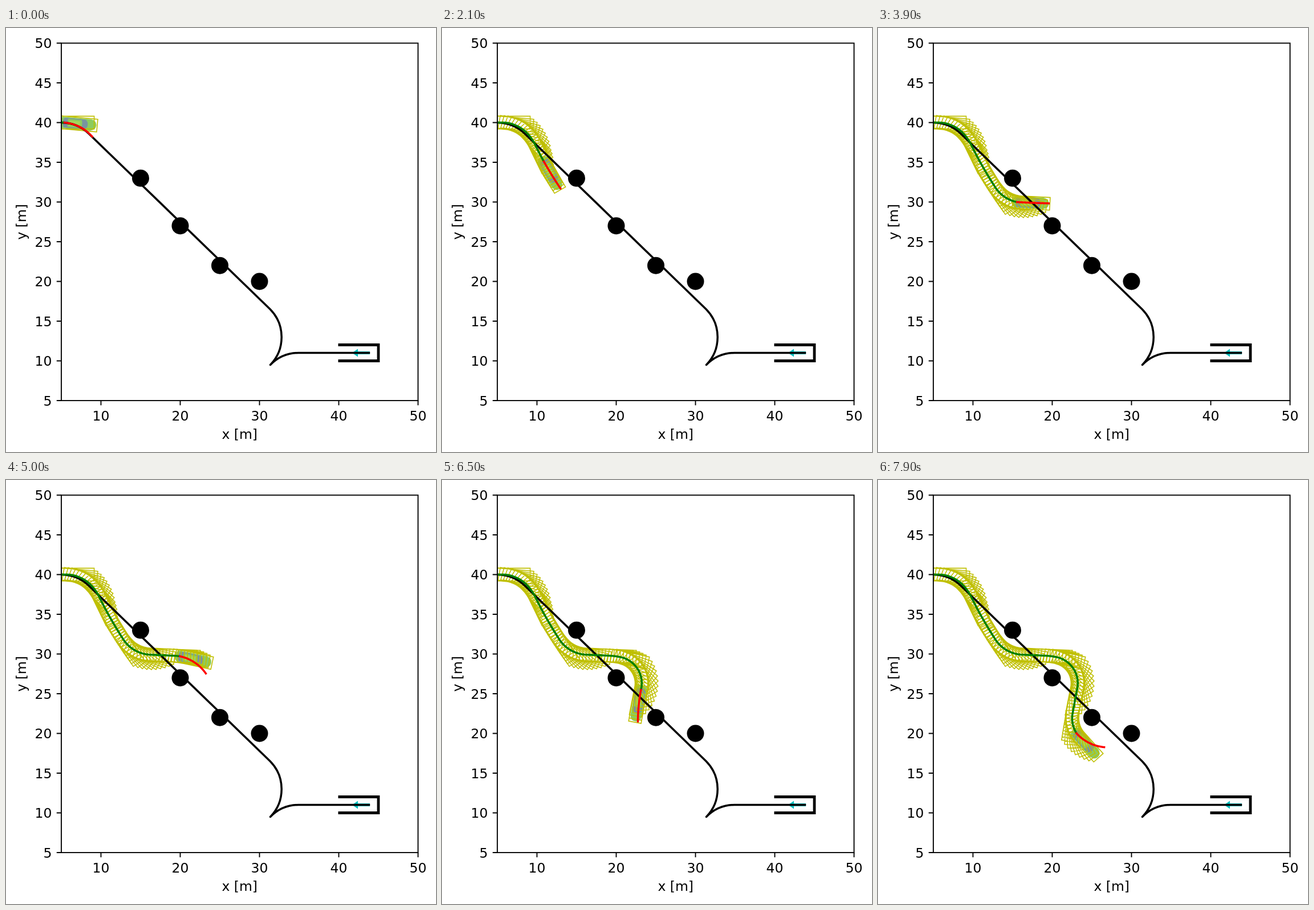
Write an HTML page that moves like this. It is 754 px wide and 742 px high and loops after 8 s.

```html
<!DOCTYPE html>
<html lang="en">
<head>
<meta charset="utf-8">
<title>Parking planner</title>
<style>
  html, body { margin: 0; width: 100%; height: 100%; overflow: hidden; background: #fff; }
  svg { display: block; width: 754px; height: 742px; }
  text { font: 23.5px "DejaVu Sans", sans-serif; }
  .line { fill: none; stroke-width: 3.5; stroke-linejoin: round; }
  .axis { fill: none; stroke: #000; stroke-width: 1.88; }
</style>
</head>
<body>
<svg viewBox="0 0 754 742">
  <clipPath id="area"><rect x="97" y="26.5" width="625.5" height="625.5"/></clipPath>
  <g clip-path="url(#area)">
    <g id="car">
      <path fill="#8ccb5e" d="M-3-10H46Q56-8 56 0T46 10H-3Q-8 9-8 0T-3-10Z"/>
      <path fill="#7894a0" d="M0-8.5H36Q41-6 41 0T36 8.5H0Q-3 6-3 0T0-8.5Z"/>
      <path fill="#8ccb5e" d="M6-7H30Q32 0 30 7H6Q4 0 6-7Z"/>
      <path fill="#a5d65a" d="M9-4.5H27V4.5H9Z"/>
    </g>
    <path fill="#00bfbf" d="M638 566H617V561.5L607 568.5L617 575.5V571H638Z"/>
    <path id="boxes" fill="none" stroke="#bfbf00" stroke-width="1.6"/>
    <path class="line" stroke="#000" stroke-linecap="square" d="M97 165.5A69.5 69.5 0 0 1 145.5 185.2L463 492A69.5 69.5 0 0 1 463.5 589.5A69.5 69.5 0 0 1 512.5 568.5H636.5"/>
    <path fill="none" stroke="#000" stroke-width="4.8" d="M582.5 554.5H653V582.5H582.5"/>
    <g id="obstacles"></g>
    <path id="trail" class="line" stroke="#008000"/>
    <path id="plan" class="line" stroke="#f00" stroke-linecap="square"/>
  </g>
  <rect class="axis" x="97" y="26.5" width="625.5" height="625.5"/>
  <path id="ticks" class="axis"/>
  <g id="labels">
    <text x="409.7" y="719" text-anchor="middle">x [m]</text>
    <text transform="translate(35 339.3) rotate(-90)" text-anchor="middle">y [m]</text>
  </g>
</svg>
<script>
const SCALE = 13.9, STEP = 100, STEPS = 80;
const REAR = -8, FRONT = 57.6, HALF = 11.1, REACH = 55.6;
const LAG = 1.5;       // steps by which the course trails the heading
const LOOKAHEAD = 7;   // steps used to estimate the planned turn
const MAX_TURN = 43;   // degrees over one planned arc

const $ = id => document.getElementById(id);
const px = x => 97 + (x - 5) * SCALE;
const py = y => 652 - (y - 5) * SCALE;
const cos = deg => Math.cos(deg * Math.PI / 180);
const sin = deg => Math.sin(deg * Math.PI / 180);
const point = (x, y) => x.toFixed(2) + " " + y.toFixed(2);

function add(parent, tag, attrs, text = "") {
  const el = document.createElementNS("http://www.w3.org/2000/svg", tag);
  for (const key in attrs) el.setAttribute(key, attrs[key]);
  el.textContent = text;
  $(parent).append(el);
}

let ticks = "";
for (let v = 10; v <= 50; v += 10) {
  ticks += `M${px(v)} 652v8.2`;
  add("labels", "text", { x: px(v), y: 686.5, "text-anchor": "middle" }, v);
}
for (let v = 5; v <= 50; v += 5) {
  ticks += `M97 ${py(v)}h-8.2`;
  add("labels", "text", { x: 80.5, y: py(v) + 8.6, "text-anchor": "end" }, v);
}
$("ticks").setAttribute("d", ticks);
for (const [x, y] of [[15, 33], [20, 27], [25, 22], [30, 20]])
  add("obstacles", "circle", { cx: px(x), cy: py(y), r: 15 });

// Steering: heading in degrees at a few steps, linear in between
const steering = [
  [0, 0], [9, 47], [14, 64], [30, 57], [40, 3], [47, 2],
  [51, 12], [64, 101], [72, 100], [88, -4]
];

function heading(step) {
  const s = Math.max(0, step);
  const i = Math.max(1, steering.findIndex(k => k[0] >= s));
  const [s0, h0] = steering[i - 1], [s1, h1] = steering[i];
  return h0 + (h1 - h0) * (s - s0) / (s1 - s0);
}

// Cruising speed in pixels per step, easing off around the first obstacle
const speed = step => 5.58 - 0.9 * Math.exp(-(((step - 15) / 5) ** 2));

function plannedTurn(step) {
  const turn = (heading(step + LOOKAHEAD) - heading(step)) * 10 / LOOKAHEAD;
  return Math.max(-MAX_TURN, Math.min(MAX_TURN, turn));
}

const poses = [];
for (let i = 0, x = px(5), y = py(40); i <= STEPS; i++) {
  poses.push({ x, y, h: heading(i), turn: plannedTurn(i) });
  const course = heading(i + 0.5 - LAG);
  x += speed(i) * cos(course);
  y += speed(i) * sin(course);
}

function box({ x, y, h }) {
  const c = cos(h), s = sin(h);
  const corner = (a, b) => point(x + a * c - b * s, y + a * s + b * c);
  return `M${corner(REAR, -HALF)}L${corner(FRONT, -HALF)}L${corner(FRONT, HALF)}L${corner(REAR, HALF)}Z`;
}

function plannedArc({ x, y, h, turn }) {
  const n = 20, pts = [point(x, y)];
  for (let i = 0; i < n; i++) {
    const a = h + turn * (i + 0.5) / n;
    x += REACH / n * cos(a);
    y += REACH / n * sin(a);
    pts.push(point(x, y));
  }
  return "M" + pts.join("L");
}

let shown = -1;
function draw(step) {
  if (step === shown) return;
  shown = step;
  const past = poses.slice(0, step + 2), now = past[step + 1];
  $("boxes").setAttribute("d", past.map(box).join(""));
  $("trail").setAttribute("d", "M" + past.map(p => point(p.x, p.y)).join("L"));
  $("plan").setAttribute("d", plannedArc(now));
  $("car").setAttribute("transform", `translate(${point(now.x, now.y)}) rotate(${now.h})`);
}

const start = performance.now();
function tick() {
  draw(Math.floor((performance.now() - start) / STEP) % STEPS);
  requestAnimationFrame(tick);
}
tick();
</script>
</body>
</html>
```
